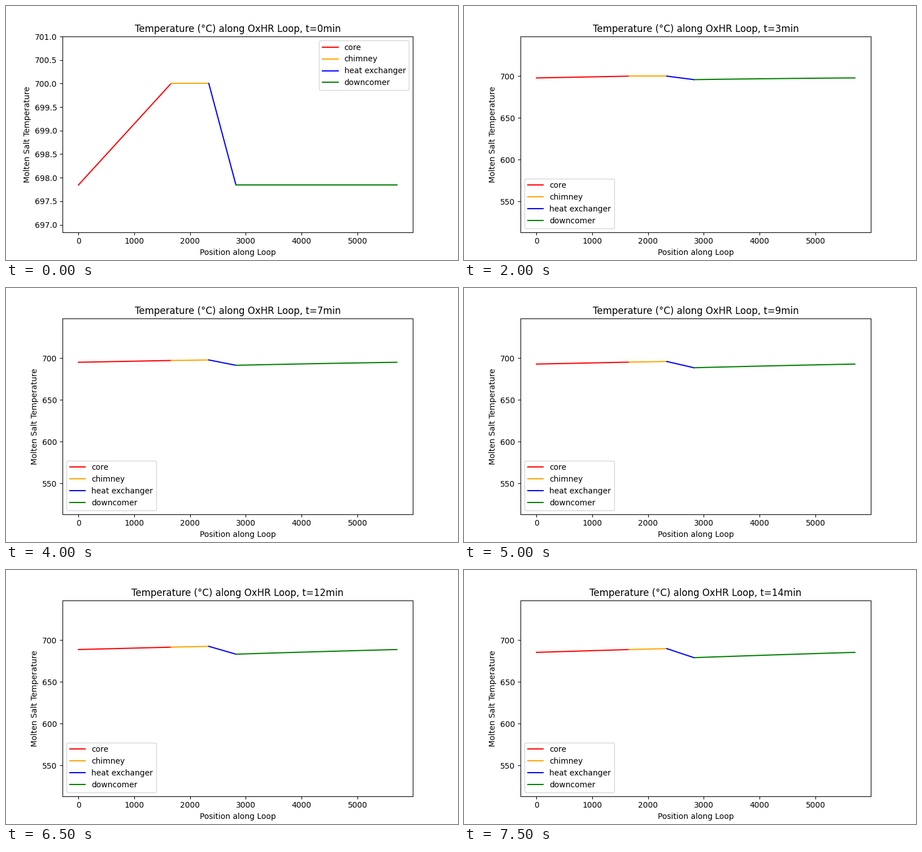
A matplotlib script that plays this animation: 800x450 px, repeating every 8000 ms.

```python
import numpy as np
import matplotlib.pyplot as plt
from matplotlib.animation import FuncAnimation

# Positions of the section borders along the loop
CORE_END, CHIMNEY_END, EXCHANGER_END, LOOP_END = 1660, 2337, 2823, 5707
SPEED = 915.0  # salt travel per minute
HOT, COLD = 700.0, 697.845
RETURN_DELAY = (LOOP_END - EXCHANGER_END) / SPEED

SECTIONS = [("core", "red"), ("chimney", "orange"),
            ("heat exchanger", "blue"), ("downcomer", "green")]


def exchanger_out(t):
    t = np.maximum(t, 0)
    return COLD - 0.485 * t - 0.0613 * t**2


def core_out(t):
    t = np.maximum(t - RETURN_DELAY, 0)
    return HOT - 0.56 * t - 0.044 * t**2


def profiles(t):
    """Position and temperature arrays of each section at minute t."""
    chimney = np.linspace(CORE_END, CHIMNEY_END, 20)
    downcomer = np.linspace(EXCHANGER_END, LOOP_END, 60)
    chimney_temp = core_out(t - (chimney - CORE_END) / SPEED)
    downcomer_temp = exchanger_out(t - (downcomer - EXCHANGER_END) / SPEED)
    return [
        ([0, CORE_END], [downcomer_temp[-1], chimney_temp[0]]),
        (chimney, chimney_temp),
        ([CHIMNEY_END, EXCHANGER_END], [chimney_temp[-1], downcomer_temp[0]]),
        (downcomer, downcomer_temp),
    ]


fig, ax = plt.subplots(figsize=(8, 4.5), dpi=100)
lines = [ax.plot([], [], color=color, label=name)[0] for name, color in SECTIONS]
margin = 0.05 * LOOP_END
ax.set_xlim(-margin, LOOP_END + margin)
ax.set_xticks(range(0, 6000, 1000))
ax.set_xlabel("Position along Loop")
ax.set_ylabel("Molten Salt Temperature")


def update(frame):
    minute = max(frame - 1, 0)
    for line, (x, y) in zip(lines, profiles(minute)):
        line.set_data(x, y)
    if minute == 0:
        ax.set_ylim(COLD - 1, HOT + 1)
        ax.legend(loc="upper right")
    else:
        ax.set_ylim(513.3, 747.5)
        ax.legend(loc="lower left")
    ax.set_title(f"Temperature (°C) along OxHR Loop, t={minute}min")
    return lines


anim = FuncAnimation(fig, update, frames=16, init_func=lambda: update(0),
                     interval=500, repeat=True, repeat_delay=0, blit=False)
plt.show()
```
